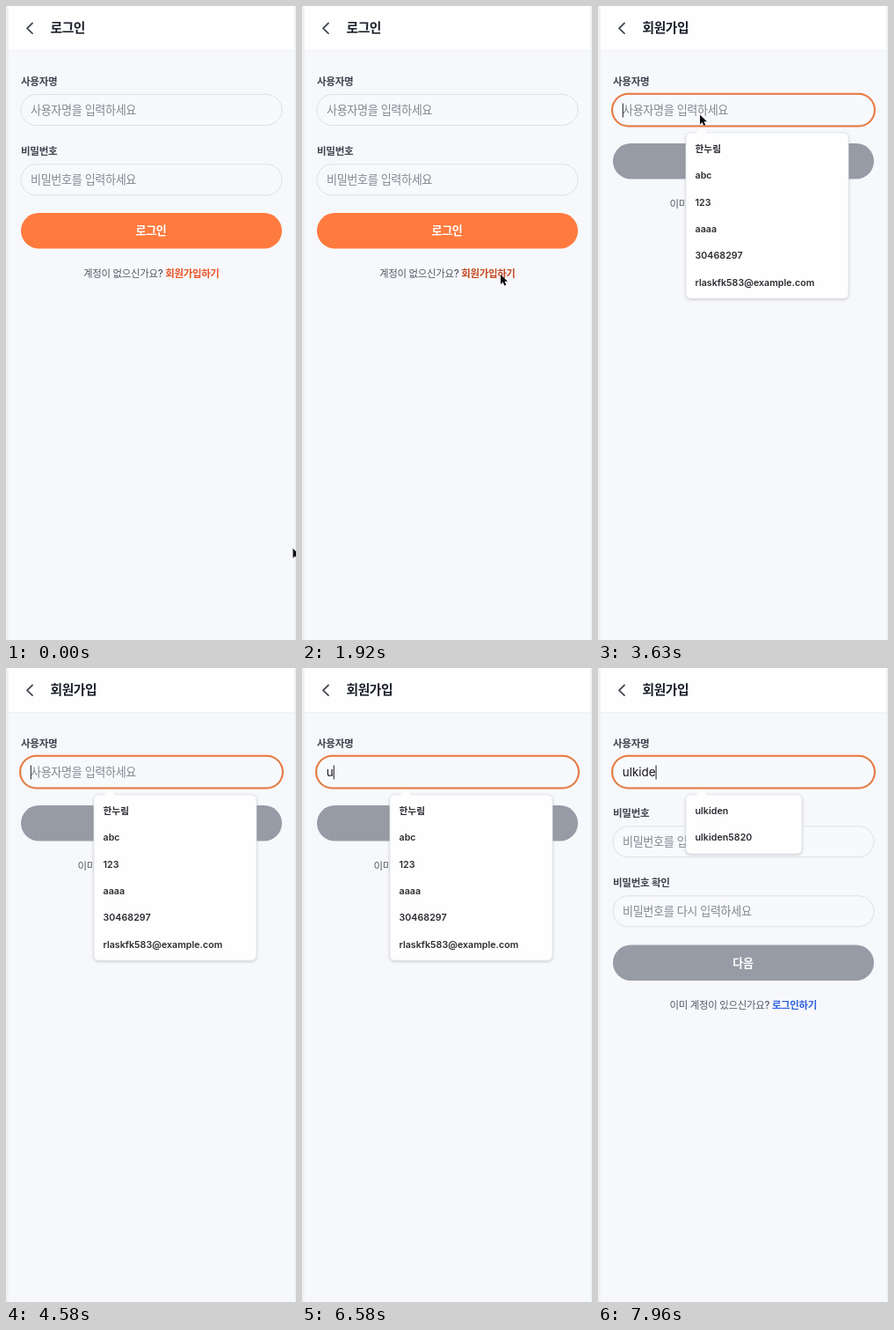
Recreate the animation shown at these times as an HTML page. Size 330 by 720 pixels, loop 8 s.

```html
<!DOCTYPE html>
<html lang="ko">
<head>
<meta charset="utf-8">
<title>로그인</title>
<style>
  html, body { margin: 0; width: 100%; height: 100%; overflow: hidden; background: #f7f8fb; }
  svg { display: block; width: 100vw; height: 100vh; }
  text { font-family: Inter, "Noto Sans CJK KR", "Noto Sans CJK", sans-serif; white-space: pre; }
  .ko { letter-spacing: -.029em; }
  .title { font-size: 14.8px; font-weight: 700; fill: #1b202b; }
  .label { font-size: 11.6px; font-weight: 600; fill: #40454f; }
  .hint { font-size: 13.1px; fill: #83868f; }
  .btn { font-size: 13.1px; font-weight: 600; fill: #fff; text-anchor: middle; }
  .foot { font-size: 11.5px; font-weight: 500; fill: #555a66; text-anchor: middle; }
  .link { font-weight: 600; }
  .item { font-size: 10.7px; font-weight: 600; fill: #2a2b30; }
  .typed { font-size: 13.4px; fill: #15171c; }
</style>
</head>
<body>
<svg id="stage" viewBox="0 0 330 720" preserveAspectRatio="none"></svg>
<script>
const LOOP = 8000;
const OPEN_SIGNUP = 2250, FOCUS = 3350, SUGGEST = 3450, HIDE_CURSOR = 4100;
const FILTER = 6640, REVEAL = 6750;
const NAME = "ulkiden";
const KEYS = [6530, 6850, 7080, 7310, 7560, 7820];
// cursor stops: time, x, y
const STOPS = [[0, 326.5, 616], [80, 325.5, 612], [760, 228, 304], [1500, 228, 304],
  [1800, 226, 305], [2500, 226, 305], [3150, 116, 123.5]];

const text = (cls, x, y, s) => `<text class="${cls}" x="${x}" y="${y}">${s}</text>`;
const pill = (y, h, attrs) =>
  `<rect x="17" y="${y}" width="297" height="${h}" rx="${h / 2}" ${attrs}/>`;
const field = (label, hint, y) =>
  text("label ko", 17, y - 10.5, label) +
  pill(y + .5, 35, 'fill="#f8f9fc" stroke="#dde0ea"') +
  (hint ? text("hint ko", 28, y + 22.8, hint) : "");
const button = (y, color, s) =>
  pill(y, 40.5, `fill="${color}"`) + text("btn ko", 165, y + 25, s);
const footer = (y, s, link, color, id) =>
  `<text class="foot ko" x="165.3" y="${y}">${s} <tspan id="${id}" class="link" fill="${color}">${link}</tspan></text>`;
const menu = (id, w, items) => {
  const h = items.length * 30.3 + 6.3;
  return `<g id="${id}">
    <path d="M106 144h${w - 12}q6 0 6 6v${h - 12}q0 6 -6 6h${12 - w}q-6 0 -6 -6v${12 - h}q0 -6 6 -6z"
      fill="#fefefe" stroke="#e2e4ea" stroke-width=".8" filter="url(#shade)"/>
    <path d="M111 144.6l7 -6.6l7 6.6z" fill="#fefefe"/>
    ${items.map((s, i) => text("item", 110.5, 166 + i * 30.3, s)).join("")}
  </g>`;
};

const stage = document.getElementById("stage");
stage.innerHTML = `
  <defs><filter id="shade" x="-10%" y="-10%" width="120%" height="125%">
    <feDropShadow dx="0" dy="1" stdDeviation="1.5" flood-color="#60646e" flood-opacity=".35"/>
  </filter></defs>
  <rect width="330" height="720" fill="#f7f8fb"/>
  <rect width="330" height="50" fill="#fefefe"/>
  <path d="M0 50.5H330" stroke="#f0f1f5"/>
  <rect width="3" height="720" fill="#eef1f3"/>
  <rect x="328" width="2" height="720" fill="#eef1f3"/>
  <path d="M30 19.5L24 25.3L30 31.1" fill="none" stroke="#434853" stroke-width="1.8" stroke-linecap="round" stroke-linejoin="round"/>
  <g id="login">
    ${text("title ko", 50.5, 30.3, "로그인")}
    ${field("사용자명", "사용자명을 입력하세요", 100)}
    ${field("비밀번호", "비밀번호를 입력하세요", 179.3)}
    ${button(235, "#ff7a3d", "로그인")}
    ${footer(308, "계정이 없으신가요?", "회원가입하기", "#ea5426", "join")}
  </g>
  <g id="signup">
    ${text("title ko", 50.5, 30.3, "회원가입")}
    ${field("사용자명", "", 100)}
    <rect id="ring" x="16" y="99.7" width="299" height="36.8" rx="18.4" fill="none" stroke="#ea783c" stroke-width="2"/>
    <g id="hint">${text("hint ko", 28, 122.8, "사용자명을 입력하세요")}</g>
    <text id="typed" class="typed" x="27.8" y="122.8"></text>
    <path id="caret" d="M0 110.5v16" stroke="#15171c"/>
    <g id="extra">
      ${field("비밀번호", "비밀번호를 입력하세요", 179.3)}
      ${field("비밀번호 확인", "비밀번호를 다시 입력하세요", 258.3)}
    </g>
    <g id="lower">
      ${button(156, "#979ba5", "다음")}
      ${footer(228.7, "이미 계정이 있으신가요?", "로그인하기", "#2f62e2", "back")}
    </g>
    ${menu("history", 185, ["한누림", "abc", "123", "aaaa", "30468297", "rlaskfk583@example.com"])}
    ${menu("matches", 132, [NAME, NAME + "5820"])}
  </g>
  <path id="cursor" d="M0 0V11L2.6 8.6L4.3 12.6L6.3 11.7L4.6 7.8H8Z" fill="#0c0c0e" stroke="#fff" stroke-width=".9" stroke-linejoin="round" paint-order="stroke"/>`;

const el = {};
stage.querySelectorAll("[id]").forEach(n => el[n.id] = n);
const show = (id, on) => el[id].setAttribute("display", on ? "inline" : "none");
const clamp = v => Math.min(1, Math.max(0, v));
const smooth = v => v * v * (3 - 2 * v);

function cursorAt(t) {
  let i = 0;
  while (i < STOPS.length - 2 && t >= STOPS[i + 1][0]) i++;
  const [t0, x0, y0] = STOPS[i], [t1, x1, y1] = STOPS[i + 1];
  const k = smooth(clamp((t - t0) / (t1 - t0)));
  return [x0 + (x1 - x0) * k, y0 + (y1 - y0) * k];
}

function draw(t) {
  const signup = t >= OPEN_SIGNUP;
  show("login", !signup);
  show("signup", signup);

  const [x, y] = cursorAt(t);
  el.cursor.setAttribute("transform", `translate(${x} ${y})`);
  show("cursor", t < HIDE_CURSOR);
  const hover = x > 181 && x < 243 && y > 296 && y < 312;
  el.join.setAttribute("fill", hover ? "#c54a20" : "#ea5426");

  const count = KEYS.filter(k => t >= k).length;
  el.typed.textContent = NAME.slice(0, count);
  show("hint", !count);
  show("ring", t >= FOCUS);

  const since = count ? KEYS[count - 1] : FOCUS;
  show("caret", t >= FOCUS && Math.floor((t - since) / 500) % 2 === 0);
  const end = count ? el.typed.getComputedTextLength() : 0;
  el.caret.setAttribute("transform", `translate(${28.3 + end} 0)`);

  show("history", t >= SUGGEST && t < FILTER);
  show("matches", t >= FILTER);

  const k = 1 - (1 - clamp((t - REVEAL) / 200)) ** 3;
  show("extra", k > 0);
  el.extra.setAttribute("opacity", k);
  el.lower.setAttribute("transform", `translate(0 ${158.5 * k})`);
}

const start = performance.now();
function tick() {
  draw((performance.now() - start) % LOOP);
  requestAnimationFrame(tick);
}
tick();
</script>
</body>
</html>
```
